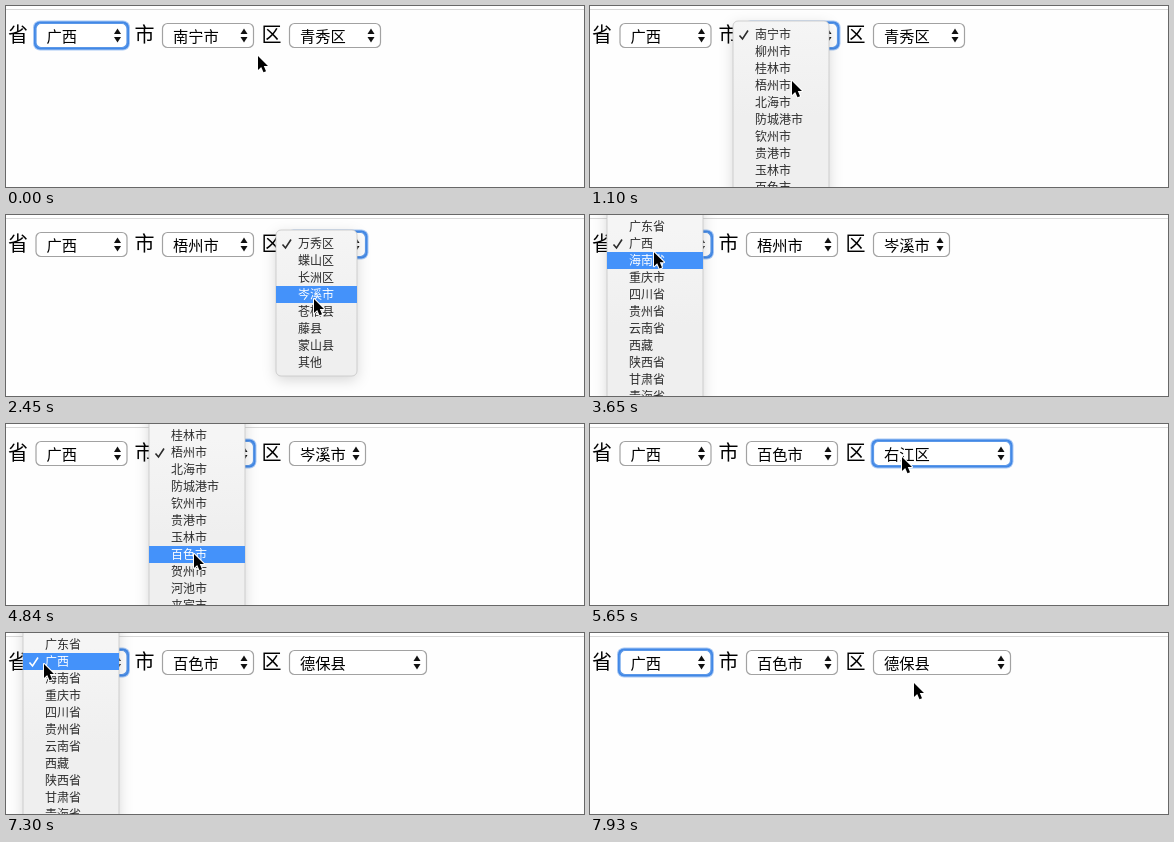
Write an HTML page with a canvas that moves like this. It is 578 px wide and 181 px high and loops after 7.99 s.

```html
<!DOCTYPE html>
<html lang="zh-CN">
<head>
<meta charset="utf-8">
<style>
html, body { margin: 0; width: 100%; height: 100%; overflow: hidden; background: #fff; }
canvas { display: block; }
</style>
</head>
<body>
<canvas id="stage" width="578" height="181"></canvas>
<script>
const ctx = document.getElementById('stage').getContext('2d');
const LOOP = 7990, ROW = 17, FIRST_ROW = 20;
const FONT = '"Noto Sans CJK SC", "Noto Sans CJK", sans-serif';
const words = s => s.split(' ');

const provinces = words('黑龙江省 湖南省 广东省 广西 海南省 重庆市 四川省 贵州省 云南省 西藏 陕西省 甘肃省 青海省 宁夏');
const cities = words('南宁市 柳州市 桂林市 梧州市 北海市 防城港市 钦州市 贵港市 玉林市 百色市 贺州市 河池市 来宾市 崇左市');
const districts = {
  南宁市: words('青秀区 兴宁区 江南区 西乡塘区'),
  梧州市: words('万秀区 蝶山区 长洲区 岑溪市 苍梧县 藤县 蒙山县 其他'),
  百色市: words('右江区 凌云县 平果县 西林县 乐业县 德保县 田林县 田阳县 靖西县 田东县 那坡县 隆林各族自治县')
};
const lefts = [29.5, 156, 283];

// Each visit to a select: focus, menu opens, chosen row blinks, menu fades.
const visits = [
  { box: 1, focus: 280, open: 340, blink: 1080, pick: 3 },
  { box: 2, focus: 1620, open: 1740, blink: 2540, pick: 3 },
  { box: 0, focus: 3020, open: 3140, blink: 3980, pick: 3 },
  { box: 1, focus: 4490, open: 4670, blink: 4990, pick: 9 },
  { box: 2, focus: 5650, open: 5700, blink: 6270, pick: 5 },
  { box: 0, focus: 6820, open: 6900, blink: 7360, pick: 3 }
];
const BLINK = 60, FADE_AT = 120, FADE = 160;

// Pointer moves: start, end, x, y
const moves = [
  [0, 0, 252, 50], [50, 280, 200, 33], [750, 1000, 202, 75], [1180, 1510, 310, 32],
  [2210, 2430, 308, 84], [2600, 2960, 62, 35], [3600, 3645, 64, 37.3], [3660, 3740, 65, 42],
  [3760, 3920, 66, 32], [4090, 4440, 234, 33], [4650, 4830, 188, 130], [5080, 5420, 312, 33],
  [6010, 6240, 316, 106], [6420, 6760, 38, 31], [7430, 7930, 324, 50]
];

function pointerAt(t) {
  let [, , x, y] = moves[0];
  for (const [start, end, toX, toY] of moves.slice(1)) {
    if (t < start) break;
    const p = Math.min(1, (t - start) / (end - start));
    const ease = p * p * (3 - 2 * p);
    x += (toX - x) * ease;
    y += (toY - y) * ease;
  }
  return { x, y };
}

function stateAt(t) {
  const state = { focus: 0, picks: [3, 0, 0], menu: null };
  for (const v of visits) {
    if (t >= v.focus) state.focus = v.box;
    if (t >= v.blink + FADE_AT + FADE) {
      if (v.box === 1) state.picks[2] = 0;
      state.picks[v.box] = v.pick;
    } else if (t >= v.open) state.menu = v;
  }
  state.lists = [provinces, cities, districts[cities[state.picks[1]]]];
  return state;
}

function text(str, x, y, size, color, weight = 400) {
  ctx.font = `${weight} ${size}px ${FONT}`;
  ctx.fillStyle = color;
  ctx.fillText(str, x, y);
}

function roundRect(x, y, w, h, r) {
  ctx.beginPath();
  ctx.roundRect(x, y, w, h, r);
}

function polygon(...points) {
  ctx.beginPath();
  points.forEach(([x, y]) => ctx.lineTo(x, y));
  ctx.closePath();
}

const widthOf = list => Math.round(31 + 15.25 * Math.max(...list.map(s => s.length)));

function drawSelect(x, list, pick, focused) {
  const w = widthOf(list), mid = x + w - 10;
  if (focused) {
    roundRect(x - 2.5, 14.5, w + 5, 30, 7);
    ctx.fillStyle = '#a9c9f5';
    ctx.fill();
    roundRect(x - 1.5, 15.5, w + 3, 28, 6);
    ctx.fillStyle = '#4288e6';
    ctx.fill();
  }
  roundRect(x + .5, 17.5, w - 1, 24, 5);
  ctx.fillStyle = '#fff';
  ctx.fill();
  ctx.strokeStyle = focused ? '#5b98e8' : '#a2a2a2';
  ctx.lineWidth = 1.2;
  ctx.stroke();
  text(list[pick], x + 11, 36, 15.3, '#000');
  ctx.fillStyle = '#111';
  polygon([mid - 3.5, 28], [mid + 3.5, 28], [mid, 22.5]);
  ctx.fill();
  polygon([mid - 3.5, 31], [mid + 3.5, 31], [mid, 36.5]);
  ctx.fill();
}

function drawMenu(t, { box, blink, pick }, list, chosen, pointer) {
  const x = Math.round(lefts[box]) - 13, w = widthOf(list) + 4;
  const top = FIRST_ROW - chosen * ROW;
  const phase = t - blink;
  const hover = chosen + Math.floor((pointer.y - FIRST_ROW) / ROW);
  const lit = phase < 0 ? hover : phase < BLINK ? -1 : pick;
  const fill = ctx.createLinearGradient(0, 15, 0, 110);
  fill.addColorStop(0, '#f5f5f5');
  fill.addColorStop(1, '#efefef');

  ctx.save();
  ctx.globalAlpha = Math.min(1, 1 - (phase - FADE_AT) / FADE);
  roundRect(x, top - 5, w, list.length * ROW + 10, 5);
  ctx.save();
  ctx.shadowColor = 'rgba(0,0,0,.16)';
  ctx.shadowBlur = 14;
  ctx.shadowOffsetY = 4;
  ctx.fillStyle = fill;
  ctx.fill();
  ctx.restore();
  ctx.strokeStyle = '#c6c6c6';
  ctx.lineWidth = .8;
  ctx.stroke();

  list.forEach((name, i) => {
    const y = top + i * ROW;
    if (i === lit) {
      ctx.fillStyle = '#4492fa';
      ctx.fillRect(x, y, w, ROW);
    }
    text(name, x + 22, y + 13, 12, i === lit ? '#fff' : '#2b2b2b', i === lit ? 500 : 400);
  });

  ctx.beginPath();
  ctx.moveTo(x + 6.5, FIRST_ROW + 9.5);
  ctx.lineTo(x + 9.5, FIRST_ROW + 13);
  ctx.lineTo(x + 15, FIRST_ROW + 4.5);
  ctx.strokeStyle = lit === chosen ? '#fff' : '#2b2b2b';
  ctx.lineWidth = 1.6;
  ctx.stroke();
  ctx.restore();
}

function drawPointer({ x, y }) {
  ctx.save();
  ctx.translate(x, y);
  polygon([0, 0], [0, 14], [3.2, 11], [5.5, 16.3], [8, 15.2], [5.8, 10], [10, 10]);
  ctx.lineJoin = 'round';
  ctx.strokeStyle = '#fff';
  ctx.lineWidth = 2;
  ctx.stroke();
  ctx.fillStyle = '#000';
  ctx.fill();
  ctx.restore();
}

function draw(t) {
  const { focus, picks, menu, lists } = stateAt(t);
  const pointer = pointerAt(t);
  ctx.fillStyle = '#fff';
  ctx.fillRect(0, 0, 578, 181);
  ctx.fillStyle = '#fefefe';
  ctx.fillRect(0, 4, 578, 177);
  ctx.fillStyle = '#d8d8d8';
  ctx.fillRect(0, 3, 578, 1);
  ['省', '市', '区'].forEach((label, i) => text(label, [2, 128.5, 255.5][i], 36, 20, '#000'));
  lists.forEach((list, i) => drawSelect(lefts[i], list, picks[i], focus === i));
  if (menu) drawMenu(t, menu, lists[menu.box], picks[menu.box], pointer);
  drawPointer(pointer);
}

const began = performance.now();
function tick() {
  draw((performance.now() - began) % LOOP);
  requestAnimationFrame(tick);
}
tick();
</script>
</body>
</html>
```
